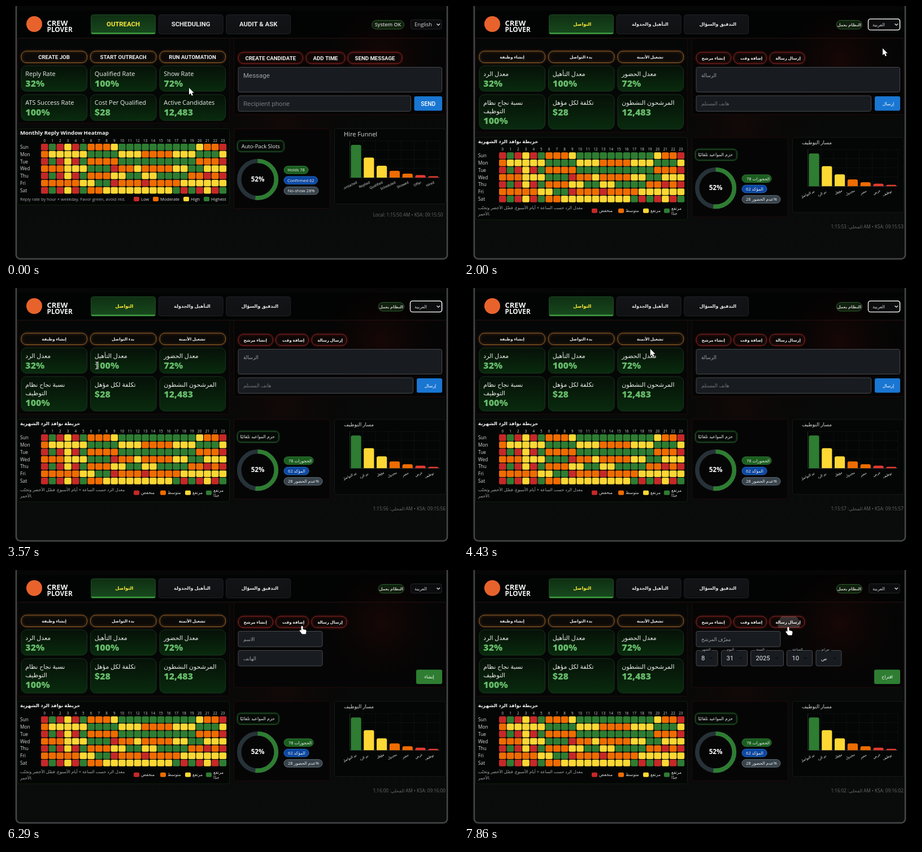
An HTML page with a canvas that plays this animation: 800x450 px, repeating every 8000 ms.

```html
<!DOCTYPE html>
<html lang="en">
<head>
<meta charset="utf-8">
<title>Recruiting dashboard</title>
<style>
html, body { margin: 0; width: 100%; height: 100%; overflow: hidden; background: #000; }
canvas { display: block; width: 100vw; height: 100vh; }
</style>
</head>
<body>
<canvas id="stage" width="800" height="450"></canvas>
<script>
const ctx = document.getElementById('stage').getContext('2d');
const LOOP = 8000, STEP = 1000 / 7;
const SANS = '"Open Sans", "Noto Sans", "DejaVu Sans", sans-serif';
const ROBOTO = 'Roboto, "DejaVu Sans", sans-serif';
const COLORS = { R: '#c62828', O: '#ef6c00', Y: '#fdd835', G: '#2e7d32' };
const HEAT = [
  'RGRYRGOOOYGGGGGGGGGGYOOR',
  'OYYYYYGGGGYYYOOOOYYYGGGY',
  'RGRYRGOOOOGGGGGGGGGGOOOR',
  'OOOYYYGGGROOYOOOOYYGGYYY',
  'RGRYRGOOOYYGGYYGGGGOOROR',
  'OOOOOYYGGROOOROOOOYYYYYY',
  'RGRYRGOOYYYYYYYYYGRGRYRG'
];
const DAYS = ['Sun', 'Mon', 'Tue', 'Wed', 'Thu', 'Fri', 'Sat'];
const VALUES = ['32%', '100%', '72%', '100%', '$28', '12,483'];
const CARD_X = [27, 149.5, 272];
// Moments when the interface changes
const FOCUS_AT = 1560, ARABIC_AT = 1850, BLUR_AT = 5270, CREATE_AT = 5420, TIME_AT = 6420;

const EN = {
  tabs: ['OUTREACH', 'SCHEDULING', 'AUDIT & ASK'], tabSize: 11.35,
  status: 'System OK', lang: 'English',
  actions: ['CREATE JOB', 'START OUTREACH', 'RUN AUTOMATION'],
  modes: ['CREATE CANDIDATE', 'ADD TIME', 'SEND MESSAGE'],
  modeBoxes: [[411, 114.5], [531, 69], [605, 96]], buttonSize: 9.65,
  cards: [['Reply Rate'], ['Qualified Rate'], ['Show Rate'], ['ATS Success Rate'], ['Cost Per Qualified'], ['Active Candidates']],
  message: 'Message', phone: 'Recipient phone', send: 'SEND', fieldSize: 11.5, sendSize: 10.3, sendX: 722.5,
  heat: 'Monthly Reply Window Heatmap', heatSize: 9.6,
  note: ['Reply rate by hour × weekday. Favor green, avoid red.'],
  legend: [[226, 'Low'], [260, 'Moderate'], [314, 'High'], [350, 'Highest']],
  pack: 'Auto-Pack Slots', packW: 82.5, packSize: 9.5,
  chips: [['Holds 78', 43], ['Confirmed 62', 59.5], ['No-show 28%', 61]],
  funnel: 'Hire Funnel', funnelSize: 11,
  stages: ['Contacted', 'Replied', 'Qualified', 'Scheduled', 'Showed', 'Offer', 'Hired'], local: 'Local'
};
const AR = {
  tabs: ['التواصل', 'التأهيل والجدولة', 'التدقيق والسؤال'], tabSize: 8.1,
  status: 'النظام يعمل', lang: 'العربية',
  actions: ['إنشاء وظيفة', 'بدء التواصل', 'تشغيل الأتمتة'],
  modes: ['إنشاء مرشح', 'إضافة وقت', 'إرسال رسالة'],
  modeBoxes: [[411, 61.5], [477.5, 58], [541, 62]], buttonSize: 7.1,
  cards: [['معدل الرد'], ['معدل التأهيل'], ['معدل الحضور'], ['نسبة نجاح نظام', 'التوظيف'], ['تكلفة لكل مؤهل'], ['المرشحون النشطون']],
  message: 'الرسالة', phone: 'هاتف المستلم', send: 'إرسال', fieldSize: 8.6, sendSize: 7.8, sendX: 727,
  heat: 'خريطة نوافذ الرد الشهرية', heatSize: 8.5,
  note: ['معدل الرد حسب الساعة × أيام الأسبوع. فضّل الأخضر وتجنّب', 'الأحمر.'],
  legend: [[226, 'منخفض'], [273, 'متوسط'], [317, 'مرتفع'], [354, 'مرتفع', 'جدًا']],
  pack: 'حزم المواعيد تلقائيًا', packW: 73.5, packSize: 7.7,
  chips: [['الحجوزات 78', 52], ['المؤكد 62', 44], ['عدم الحضور 28%', 68]],
  funnel: 'مسار التوظيف', funnelSize: 8.8,
  stages: ['تم التواصل', 'تم الرد', 'مؤهل', 'مجدول', 'حضر', 'عرض', 'توظيف'], local: 'المحلي'
};

// time, x, y of the pointer tip
const POINTER = [
  [0, 324, 145], [140, 324, 145], [1140, 742, 72], [1300, 742, 72], [1500, 745, 34], [1640, 745, 34],
  [1850, 741, 75], [2290, 741, 75], [3430, 161, 137], [3720, 161, 137], [5000, 452, 87],
  [5430, 452, 87], [6140, 524, 99], [6430, 524, 99], [7430, 573, 101], [8000, 574, 101]
];
const RIPPLES = [[5180, 0, 453, 92], [6420, 1, 524, 97], [7690, 2, 575, 97]];

function text(str, x, y, size, color = '#eee', weight = 400, align = 'left', family = SANS) {
  ctx.font = `${weight} ${size}px ${family}`;
  ctx.fillStyle = color;
  ctx.textAlign = align;
  ctx.fillText(str, x, y + size * .357);
}

function box(x, y, w, h, r, fill, stroke, line = 1, blur = 0) {
  ctx.beginPath();
  ctx.roundRect(x, y, w, h, r);
  if (fill) { ctx.fillStyle = fill; ctx.fill(); }
  if (!stroke) return;
  ctx.save();
  ctx.shadowColor = stroke;
  ctx.shadowBlur = blur;
  ctx.strokeStyle = stroke;
  ctx.lineWidth = line;
  ctx.stroke();
  ctx.restore();
}

function vertical(y0, y1, top, bottom) {
  const g = ctx.createLinearGradient(0, y0, 0, y1);
  g.addColorStop(0, top);
  g.addColorStop(1, bottom);
  return g;
}

function glow(x, y, r, color) {
  const g = ctx.createRadialGradient(x, y, 0, x, y, r);
  g.addColorStop(0, color);
  g.addColorStop(1, 'transparent');
  ctx.fillStyle = g;
  ctx.fillRect(x - r, y - r, 2 * r, 2 * r);
}

function polyline(points, color, width) {
  ctx.beginPath();
  points.forEach(([x, y]) => ctx.lineTo(x, y));
  ctx.strokeStyle = color;
  ctx.lineWidth = width;
  ctx.stroke();
}

function header(s, arabic, focused) {
  box(20, 8, 759, 49, 0, '#020303');
  ctx.fillStyle = '#191b1b';
  ctx.fillRect(20, 56.5, 759, 1);
  ctx.fillStyle = '#e8632c';
  ctx.beginPath();
  ctx.arc(50, 32, 14, 0, 7);
  ctx.fill();
  text('CREW', 72.5, 30, 13, '#f4f4f4', 700);
  text('PLOVER', 72.5, 42, 11.8, '#f4f4f4', 700);

  s.tabs.forEach((label, i) => {
    const x = 150.5 + 119.6 * i;
    box(x, 15.5, 114, 34, 4, i ? vertical(15, 50, '#121417', '#0f1113') : vertical(15, 50, '#0f2f13', '#184a1d'), i ? '#1f2225' : '#1d4a23');
    if (!i) box(x, 47, 114, 3, [0, 0, 4, 4], '#388e3c');
    text(label, x + 57, 32.3, s.tabSize, i ? '#e6e6e6' : '#ffeb3b', 700, 'center', ROBOTO);
  });

  const left = arabic ? 659 : 647.5;
  box(left, 25.5, 704.5 - left, 15.5, 8, '#0d2610', '#2e6b33');
  text(s.status, (left + 704.5) / 2, 33, arabic ? 7.1 : 9, '#eee', 600, 'center');
  if (focused) box(715.5, 23, 56, 19.5, 4, '#0b0d0f', '#f4f4f4', 1.6);
  else box(716.5, 24.5, 54.5, 16.5, 3, '#0b0d0f', '#25282b');
  text(s.lang, 723, 32.8, arabic ? 8 : 9.4);
  polyline([[762.5, 31.5], [765.2, 34.2], [768, 31.5]], '#eee', 1.3);
}

function metrics(s, arabic) {
  box(20.5, 57.5, 375, arabic ? 166 : 150, 3, '#050606', '#1d0a09');
  s.actions.forEach((label, i) => {
    box(CARD_X[i], 80, 116.5, 20.5, 9, '#0c0a08', '#99622a', 1, 4);
    text(label, CARD_X[i] + 58, 90.2, s.buttonSize, '#f2f2f2', 700, 'center', ROBOTO);
  });
  s.cards.forEach((lines, i) => {
    const x = CARD_X[i % 3], lower = i > 2, y = lower ? 157 : 106;
    const h = lower ? (arabic ? 61 : 46) : 45;
    box(x, y, 116.5, h, 9, vertical(y, y + h, '#061007', '#092b0e'), '#18351c');
    lines.forEach((line, k) => text(line, x + 7.3, y + 14 + 15 * k, 10.9, '#f0f0f0'));
    text(VALUES[i], x + 7.3, y + 31.3 + 15 * (lines.length - 1), 16, '#66bb6a', 800);
  });
}

function field(x, y, w, h, label, size, color = '#a2a5a8') {
  box(x, y, w, h, 3, '#181b20', '#46494d');
  text(label, x + 9, y + 14, size, color, 400, 'left', ROBOTO);
}

function contact(s, t, arabic) {
  const form = t >= TIME_AT ? 'time' : t >= CREATE_AT ? 'create' : 'message';
  box(403.5, 57.5, 375, form === 'message' ? 135 : 150.5, 3, '#050505', '#210b0a');
  glow(665, 95, 130, 'rgba(60,12,8,.32)');
  s.modes.forEach((label, i) => {
    const [x, w] = s.modeBoxes[i];
    box(x, 82, w, 20, 9, '#0d0706', '#8f2522', 1, 4);
    RIPPLES.filter(r => r[1] === i).forEach(([start, , cx, cy]) => {
      const age = (t - start) / 500;
      if (age < 0 || age > 1) return;
      ctx.save();
      ctx.beginPath();
      ctx.roundRect(x, 82, w, 20, 9);
      ctx.clip();
      ctx.beginPath();
      ctx.arc(cx, cy, 2 + 52 * age, 0, 7);
      ctx.fillStyle = `rgba(255,255,255,${.24 * (1 - age)})`;
      ctx.fill();
      ctx.restore();
    });
    text(label, x + w / 2, 92.2, s.buttonSize, '#f2f2f2', 700, 'center', ROBOTO);
  });

  const submit = (label, x, y, color) => {
    box(x, y, 772 - x, 25.5, 3, color);
    text(label, (x + 772) / 2, y + 13, s.sendSize, '#fff', 500, 'center', ROBOTO);
  };
  if (form === 'message') {
    field(411, 108.5, 360.5, 44, s.message, s.fieldSize);
    field(411, 159, arabic ? 309.5 : 305.5, 27.5, s.phone, s.fieldSize, '#75787b');
    submit(s.send, s.sendX, 160, '#1976d2');
    return;
  }
  if (form === 'create') {
    field(411, 108.5, 149, 27.5, 'الاسم', 8.6);
    field(411, 142.5, 149, 27.5, 'الهاتف', 8.6);
    submit('إنشاء', 726, 176.5, '#2e7d32');
    return;
  }
  field(411, 108.5, 149, 27.5, 'معرّف المرشح', 8.6);
  [[411, 38, 'الشهر', '8'], [455.5, 46, 'اليوم', '31'], [507.5, 58, 'السنة', '2025'], [571.5, 45, 'الساعة', '10'], [623, 45, 'ص/م', 'ص']]
    .forEach(([x, w, label, value]) => {
      field(x, 142.5, w, 27.5, value, /\d/.test(value) ? 11.2 : 8.6, '#eee');
      ctx.fillStyle = '#101216';
      ctx.fillRect(x + 8, 140, 19, 5);
      text(label, x + 9.5, 141, 6.4, '#a8abad');
      ctx.fillStyle = '#0b0c0e';
      ctx.beginPath();
      ctx.moveTo(x + w - 15, 155);
      ctx.lineTo(x + w - 9, 155);
      ctx.lineTo(x + w - 12, 158);
      ctx.fill();
    });
  submit('اقتراح', 726, 176.5, '#2e7d32');
}

function heatmap(s, arabic) {
  box(20.5, 217.5, 375, arabic ? 146 : 135, 3, '#040605', '#10200f');
  text(s.heat, 25, 224.5, s.heatSize, '#f2f2f2', 700);
  for (let h = 0; h < 24; h++) text(h, 68.3 + 13.72 * h, 238.3, 6.3, '#d8d8d8', 400, 'center');
  HEAT.forEach((row, r) => {
    const y = 244 + 12.78 * r;
    text(DAYS[r], 25, y + 6, 8.3, '#dadada');
    [...row].forEach((c, h) => box(62 + 13.72 * h, y, 12.6, 11.7, 2, COLORS[c]));
  });
  s.note.forEach((line, i) => text(line, 25, 342 + 11 * i, 7.5, '#a7abad'));
  s.legend.forEach(([x, ...lines], i) => {
    const y = arabic ? 347.5 : 342;
    box(x, y - 4, 10, 8, 2, COLORS['ROYG'[i]]);
    lines.forEach((line, k) => text(line, x + 13, y + (lines.length > 1 ? 9 * k - 4.5 : 0), 7.5, '#ddd'));
  });
}

function slots(s) {
  box(403.5, 217.5, 170, 141, 3, '#060506', '#210b0b');
  box(409.5, 238.5, s.packW, 19.5, 6, '#060a07', '#255f2b', 1, 3);
  text(s.pack, 409.5 + s.packW / 2, 248.2, s.packSize, '#eee', 400, 'center');
  [['#263238', 1], ['#2e7d32', .52]].forEach(([color, part]) => {
    ctx.beginPath();
    ctx.arc(445.5, 307.3, 32.8, -Math.PI / 2, Math.PI * (2 * part - .5));
    ctx.strokeStyle = color;
    ctx.lineWidth = 7.6;
    ctx.stroke();
  });
  text('52%', 445.5, 307, 11.6, '#fff', 700, 'center');
  const skins = [['#1b5e20', '#2e7d32'], ['#0d47a1', '#1e6fd0'], ['#37424a', '#63727c']];
  s.chips.forEach(([label, w], i) => {
    const y = 283.7 + 18.4 * i;
    box(492, y, w, 13.4, 6.7, ...skins[i]);
    text(label, 492 + w / 2, y + 6.9, 7.5, '#f2f2f2', 400, 'center');
  });
}

function funnel(s) {
  box(581.5, 217.5, 197, 133, 3, '#040505', '#141a14');
  text(s.funnel, 598, 227, s.funnelSize, '#dadada');
  ctx.save();
  ctx.beginPath();
  ctx.rect(598, 234, 178, 112);
  ctx.clip();
  ctx.setLineDash([2, 2]);
  for (let i = 0; i < 5; i++) polyline([[608.5, 239 + 16.2 * i], [768, 239 + 16.2 * i]], '#202322', .7);
  for (let i = 0; i < 8; i++) polyline([[608.5 + 22.8 * i, 239], [608.5 + 22.8 * i, 304]], '#202322', .7);
  ctx.setLineDash([]);
  polyline([[608.5, 239], [608.5, 304], [768, 304]], '#343838', .8);
  const heights = [58, 35.5, 21, 12, 7, 4.5, 2.5];
  heights.forEach((h, i) => {
    const x = 610.4 + 22.8 * i, r = Math.min(3, h);
    box(x, 304 - h, 18.2, h, [r, r, 0, 0], i === 0 ? '#2e7d32' : i < 3 ? '#fdd835' : i < 5 ? '#ef6c00' : '#e03a2f');
    ctx.save();
    ctx.translate(x + 10.5, 312);
    ctx.rotate(-25 * Math.PI / 180);
    text(s.stages[i], 0, 0, 6, '#e6e6e6', 400, 'right');
    ctx.restore();
  });
  ctx.restore();
}

function clock(s, t) {
  const seconds = Math.floor(50.6 + t * .00153);
  const rest = `${15 + Math.floor(seconds / 60)}:${String(seconds % 60).padStart(2, '0')}`;
  text(`${s.local}: 1:${rest} AM • KSA: 09:${rest}`, 773.5, 370.5, 8.1, '#666a68', 400, 'right');
}

function pointer(t) {
  const i = Math.max(1, POINTER.findIndex(p => p[0] >= t));
  const [t0, x0, y0] = POINTER[i - 1], [t1, x1, y1] = POINTER[i];
  const u = (t - t0) / (t1 - t0), e = u * u * (3 - 2 * u);
  const x = x0 + (x1 - x0) * e, y = y0 + (y1 - y0) * e;
  ctx.save();
  ctx.translate(x, y);
  ctx.lineJoin = 'round';
  if (t > 3400 && t < 3800) {
    const beam = [[-2.5, -6], [0, -5.2], [2.5, -6], [0, -5.2], [0, 5.7], [-2.5, 6.5], [0, 5.7], [2.5, 6.5]];
    polyline(beam, '#111', 2.6);
    polyline(beam, '#eee', 1.2);
  } else {
    const hand = y > 80 && y < 103 && x > 411 && x < 603;
    const shape = new Path2D(hand
      ? 'M-1.5 1Q0-1 1.5 1V6L6 7Q8 7.5 7.6 9.5L6.6 14.5H0L-4.2 9Q-4.8 7-3 7.3L-1.5 8.5Z'
      : 'M0 0V12L2.8 9.4L4.8 14L6.9 13.1L4.9 8.7H8.6Z');
    ctx.fillStyle = '#fff';
    ctx.strokeStyle = '#111';
    ctx.lineWidth = 1.2;
    ctx.stroke(shape);
    ctx.fill(shape);
  }
  ctx.restore();
}

function draw(now) {
  const t = Math.floor((now % LOOP + 5) / STEP) * STEP;
  const arabic = t >= ARABIC_AT, s = arabic ? AR : EN;
  ctx.direction = 'ltr';
  ctx.textBaseline = 'alphabetic';
  ctx.fillStyle = '#000';
  ctx.fillRect(0, 0, 800, 450);
  box(18, -20, 763, 468, 7, vertical(0, 450, '#060606', '#0a0c0b'), '#454648', 2.6);
  glow(490, 205, 150, 'rgba(45,8,6,.28)');
  header(s, arabic, t >= FOCUS_AT && t < BLUR_AT);
  metrics(s, arabic);
  contact(s, t, arabic);
  ctx.save();
  ctx.translate(0, arabic ? 15.3 : 0);
  heatmap(s, arabic);
  slots(s);
  funnel(s);
  ctx.translate(0, arabic ? 5 : 0);
  clock(s, t);
  ctx.restore();
  pointer(t);
  requestAnimationFrame(draw);
}
requestAnimationFrame(draw);
</script>
</body>
</html>
```
